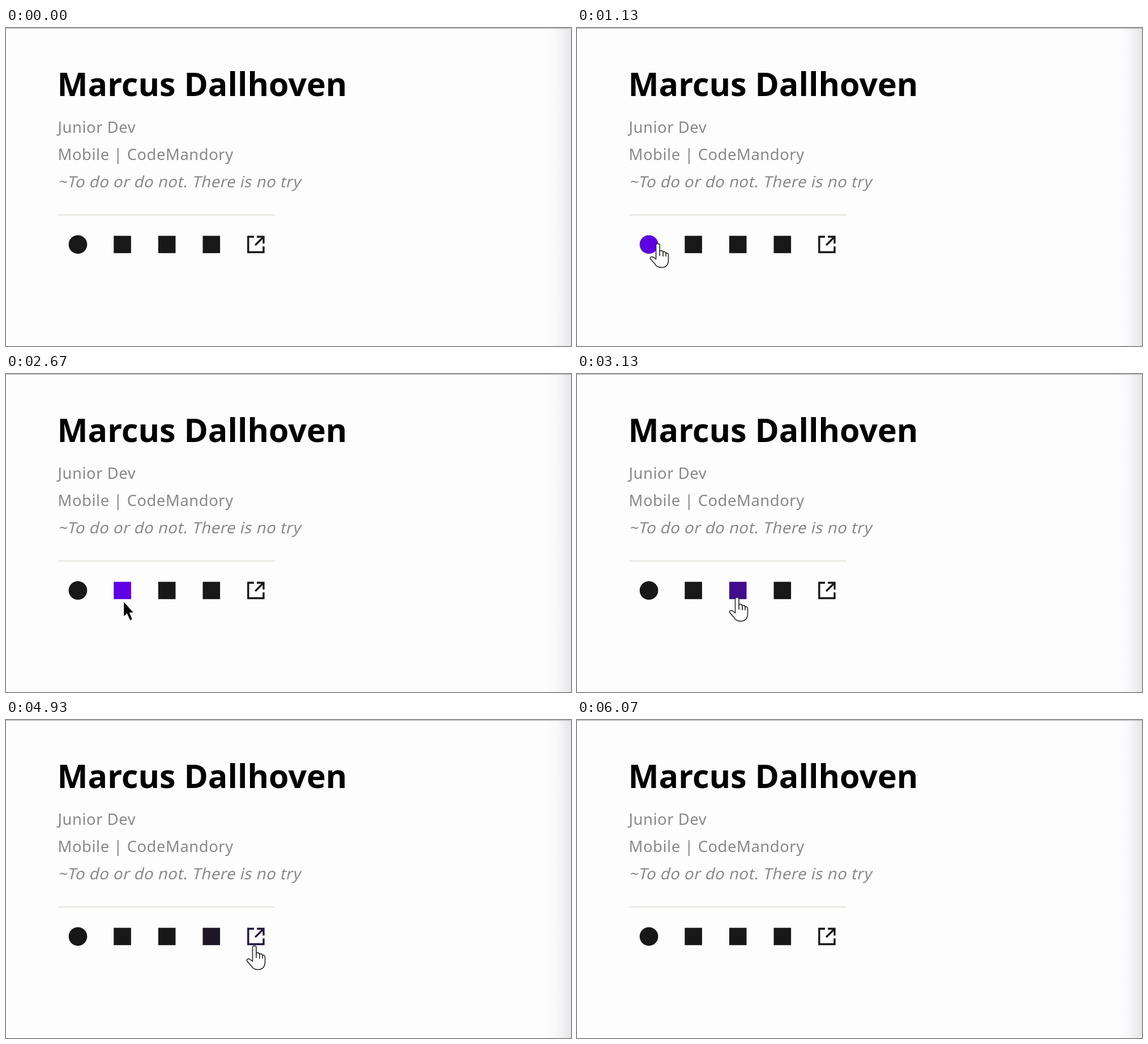
Recreate the animation shown at these times as an HTML page. Size 998 by 561 pixels, loop 6.11 s.

```html
<!DOCTYPE html>
<html lang="en">
<head>
<meta charset="utf-8">
<title>Profile card</title>
<style>
  html, body { margin: 0; width: 100%; height: 100%; overflow: hidden; background: #fdfdfd; }
  svg { display: block; width: 998px; height: 561px; }
  text { font: 27.4px "Noto Sans", "Open Sans", sans-serif; letter-spacing: .55px; fill: #888; }
  .name { font-size: 57.3px; font-weight: 700; letter-spacing: 0; fill: #000; }
</style>
</head>
<body>
<svg viewBox="0 0 998 561">
  <defs>
    <linearGradient id="edge">
      <stop offset="0" stop-color="#fdfdfd"/>
      <stop offset=".4" stop-color="#f9f9fc"/>
      <stop offset="1" stop-color="#e6e6e9"/>
    </linearGradient>
  </defs>
  <rect width="998" height="561" fill="#fdfdfd"/>
  <rect x="954" width="44" height="561" fill="url(#edge)"/>
  <rect width="998" height="1.4" fill="#bdbdbd"/>

  <text class="name" x="90.5" y="119.5">Marcus Dallhoven</text>
  <text x="91.5" y="185">Junior Dev</text>
  <text x="91.5" y="233">Mobile | CodeMandory</text>
  <text transform="translate(91.5 281) skewX(-13)">~To do or do not. There is no try</text>
  <rect x="92" y="328.4" width="383.5" height="2.8" fill="#ebe9e0"/>

  <!-- Icons share a 24-unit grid -->
  <g class="icon"><circle cx="12" cy="12" r="9.6"/></g>
  <g class="icon"><rect x="3" y="3" width="18" height="18"/></g>
  <g class="icon"><rect x="3" y="3" width="18" height="18"/></g>
  <g class="icon"><rect x="3" y="3" width="18" height="18"/></g>
  <g class="icon">
    <path d="M10 4H4V20H20V14M13 4H20V11M11.3 12.7L19.3 4.7" fill="none" stroke="currentColor" stroke-width="2"/>
  </g>

  <path id="arrow" d="M0 0V25L5.5 20L11 32L14.5 30.3L9.5 18.5H16.5Z" stroke="#fff" paint-order="stroke"/>
  <g id="hand" fill="#fff" stroke="#333" stroke-width="1.7" stroke-linejoin="round" stroke-linecap="round">
    <path d="M-3.5 3C-3.5 -1 3 -1 3 3V13.5C4 11 9 12 9 15.5C10 13 14 14 14 17.5C15 15 18.5 17 18.5 20V28C18.5 37 14 42 6 42C-1 42 -4 39 -6 35L-13 27C-15 24 -11 22 -8 24L-3.5 27.5Z"/>
    <path d="M3 13.5V21M9 15.5V22M14 17.5V22" fill="none"/>
  </g>
</svg>
<script>
const LOOP = 6110, FADE = 500, DWELL = 620;
const RIM = 401, DIP = 12;               // lower rim of the icons, sag between them
const ENTER_SPEED = .95, LEAVE_SPEED = .44;
const DARK = [24, 24, 24], ACCENT = [98, 0, 238];

// One stop per icon: arrival time, pointer x, highest pointer y
const stops = [
  { at: 780, x: 143, top: 380 },
  { at: 2040, x: 208, top: 389 },
  { at: 2980, x: 283, top: 391 },
  { at: 3960, x: 368, top: 393 },
  { at: 4890, x: 439, top: 388 }
];

const icons = document.querySelectorAll('.icon');
const arrow = document.getElementById('arrow');
const hand = document.getElementById('hand');

icons.forEach((icon, i) => {
  icon.setAttribute('transform', `translate(${106.6 + 78.6 * i} 361.5) scale(1.7)`);
  icon.setAttribute('fill', 'currentColor');
});

const easeOut = u => 1 - (1 - Math.min(1, Math.max(0, u))) ** 2.2;
const smooth = u => u * u * (3 - 2 * u);
const bump = u => Math.sin(Math.PI * u);

function pointer(t) {
  const i = stops.findLastIndex(s => t >= s.at);
  if (i < 0) return { x: stops[0].x, y: RIM + (stops[0].at - t) * ENTER_SPEED };

  const { at, x, top } = stops[i], next = stops[i + 1], away = t - at - DWELL;
  if (away < 0) return { x, y: RIM - (RIM - top) * bump((t - at) / DWELL), over: true };
  if (!next) return { x, y: RIM + away * LEAVE_SPEED };

  const u = away / (next.at - at - DWELL);
  return { x: x + (next.x - x) * smooth(u), y: RIM + DIP * bump(u) };
}

function draw() {
  const t = performance.now() % LOOP;
  stops.forEach(({ at }, i) => {
    const p = easeOut((t - at) / FADE) - easeOut((t - at - DWELL) / FADE);
    icons[i].style.color = `rgb(${DARK.map((c, k) => Math.round(c + (ACCENT[k] - c) * p))})`;
  });

  const { x, y, over } = pointer(t);
  for (const cursor of [arrow, hand]) {
    cursor.setAttribute('transform', `translate(${x} ${y})`);
    cursor.style.display = (cursor === hand) === !!over ? '' : 'none';
  }
  requestAnimationFrame(draw);
}
draw();
</script>
</body>
</html>
```
